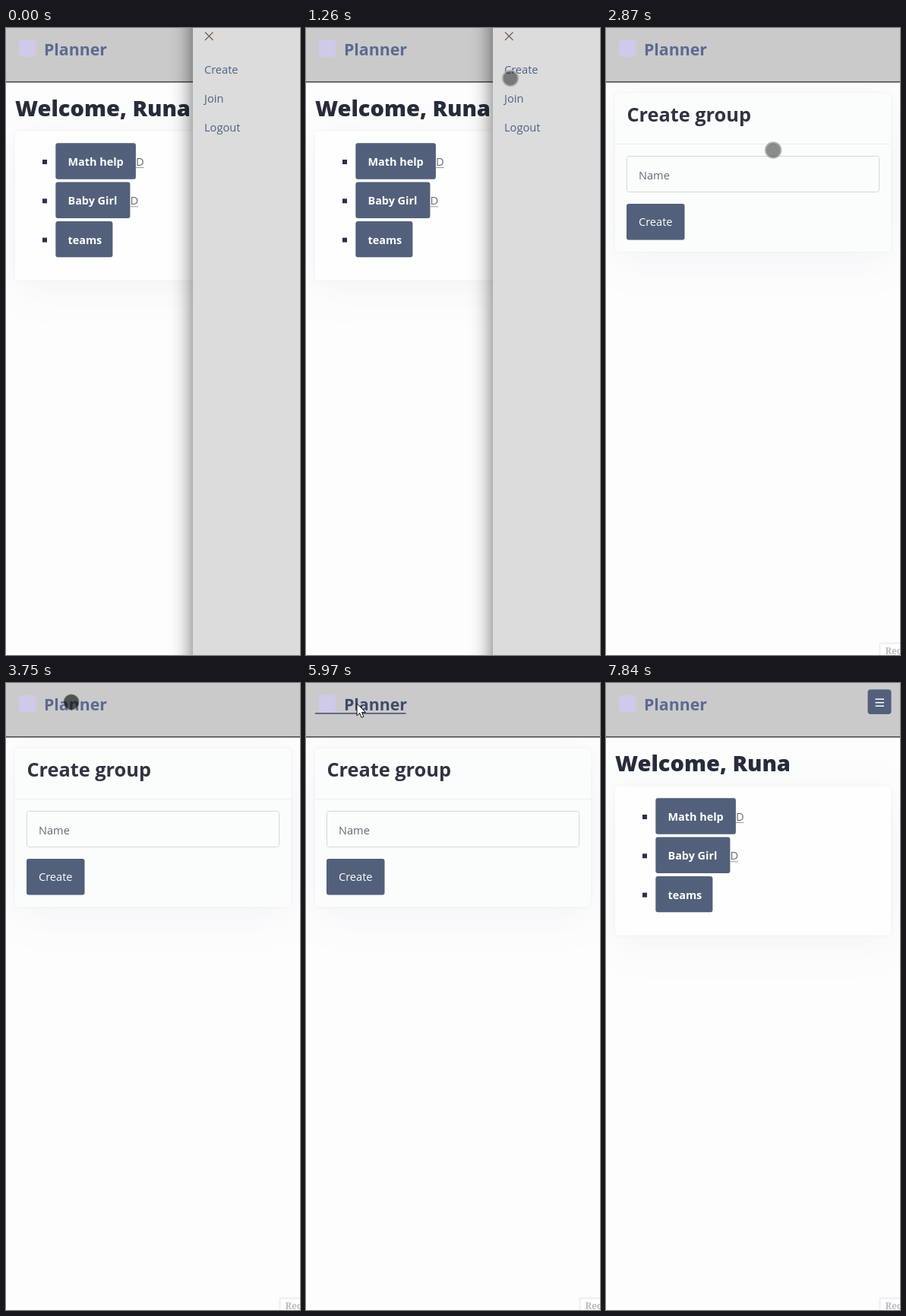
Animation, 387 px wide and 824 px high, one loop 8000 ms. Source, as an HTML page:

```html
<!DOCTYPE html>
<html lang="en">
<head>
<meta charset="utf-8">
<title>Planner</title>
<style>
  html, body { margin: 0; width: 100%; height: 100%; overflow: hidden; background: #fdfdfd; }
  svg { display: block; width: 387px; height: 824px; font: 14.6px "Open Sans", "Noto Sans", sans-serif; }
  .card { filter: drop-shadow(0 10px 28px rgba(70, 85, 150, .06)) drop-shadow(0 0 2px rgba(70, 85, 150, .06)); }
  .button { fill: #52607b; }
  .label { fill: #fff; }
  .strong { font-weight: 700; font-size: 14.4px; }
  .drawer { fill: #dcdcdc; filter: drop-shadow(0 0 14px rgba(0, 0, 0, .6)); }
  .link { fill: #4d6282; }
  .link.active { fill: #435472; }
  .brand { fill: #5b6a91; font-weight: 700; font-size: 21.3px; }
  .brand.active { fill: #3f4b6b; }
</style>
</head>
<body>
<svg viewBox="0 0 387 824">
  <rect width="387" height="824" fill="#fdfdfd"/>

  <g id="home">
    <text x="12" y="116" fill="#272d3b" font-size="29" font-weight="800">Welcome, Runa</text>
    <rect class="card" x="12" y="135.5" width="363" height="196" rx="4" fill="#fefefe"/>
    <g id="groups"></g>
  </g>

  <g id="create">
    <rect class="card" x="12" y="86" width="363" height="208" rx="4" fill="#fbfdfd"/>
    <path d="M12 152.5H375" stroke="#e9eef1"/>
    <text x="27.5" y="123" fill="#303442" font-size="25.3" font-weight="700">Create group</text>
    <rect x="27.5" y="168.5" width="332" height="47" rx="3" fill="#fbfdfd" stroke="#d3d6de"/>
    <text x="43" y="199" fill="#666a70">Name</text>
    <rect class="button" x="27" y="231" width="76.5" height="47.5" rx="3"/>
    <text class="label" x="43" y="260">Create</text>
  </g>

  <g id="badge">
    <rect x="360.5" y="808.5" width="40" height="30" fill="#fefefe" stroke="#eeeef0" stroke-width="2"/>
    <text x="367.5" y="823" fill="#b9bac4" style="font: 600 12px 'Noto Serif', serif">Rec</text>
  </g>

  <rect width="387" height="70" fill="#cacaca"/>
  <rect y="70" width="387" height="1.7" fill="#555"/>
  <rect x="17" y="16" width="22" height="22" rx="3" fill="#cfc9ea"/>
  <text id="brand" class="brand" x="50" y="36">Planner</text>
  <path id="brandLine" d="M12 40H131.5" stroke="#3f4b6b" stroke-width="1.6"/>
  <g id="menu">
    <rect class="button" x="344.5" y="8.5" width="31" height="32.5" rx="4"/>
    <path d="M354.5 21.2h11.5m-11.5 4.5h11.5m-11.5 4.5h11.5" stroke="#fff" stroke-width="1.4"/>
  </g>

  <g id="drawer">
    <rect class="drawer" x="246" y="-40" width="180" height="900"/>
    <path d="M262 5.5l10.5 10.5m0 -10.5l-10.5 10.5" stroke="#6a5a50" stroke-width="1.1"/>
    <text id="createLink" class="link" x="261" y="60">Create</text>
    <path id="createLine" d="M261 62.5H305" stroke="#435472"/>
    <text class="link" x="261" y="98">Join</text>
    <text class="link" x="261" y="136">Logout</text>
  </g>

  <circle id="touch" r="10.3" fill-opacity=".45" stroke="#b0b0b0" stroke-opacity=".8" stroke-width="2"/>
  <path id="arrow" d="M67 27v16l3.7 -3.4 2.4 5.8 2.8 -1.2 -2.4 -5.6h5z" fill="#fff" stroke="#111"/>
</svg>
<script>
  const el = id => document.getElementById(id);
  const show = (id, on) => { el(id).style.display = on ? '' : 'none'; };

  function groupRow(name, width, row, removable) {
    const y = 151 + row * 51.3;
    const end = 65 + width;
    const remove = `<text x="${end}" y="${y + 30}" fill="#6a6d75">D</text>
      <path d="M${end} ${y + 32.5}h10.5" stroke="#9a9da5"/>`;
    return `<rect x="48" y="${y + 22}" width="6" height="6" fill="#2b3048"/>
      <rect class="button" x="65.3" y="${y + .3}" width="${width - .4}" height="47.4" rx="3"/>
      <text class="label strong" x="81.5" y="${y + 30}">${name}</text>
      ${removable ? remove : ''}`;
  }
  el('groups').innerHTML =
    groupRow('Math help', 106, 0, true) +
    groupRow('Baby Girl', 98.5, 1, true) +
    groupRow('teams', 75.5, 2, false);

  // Places the pointer visits: arrival time, x, y
  const stops = [
    [260, 331, 793], [660, 256, 380], [1060, 302, 11],   // swing up to the drawer
    [1260, 269, 66], [1580, 270, 51],                    // press "Create"
    [2600, 248, 121], [2800, 234, 178],                  // drift away
    [3420, 113, 26], [3750, 86, 25], [5490, 66, 27],     // settle on the brand
    [6630, 68, 29], [7160, 212, 272], [7430, 338, 575],  // leave at the lower right
    [7840, 380, 817]
  ];

  function pointerAt(t) {
    const next = stops.findIndex(stop => stop[0] > t);
    if (next < 1) return stops[0].slice(1);
    const [t0, x0, y0] = stops[next - 1];
    const [t1, x1, y1] = stops[next];
    const k = (t - t0) / (t1 - t0);
    return [x0 + (x1 - x0) * k, y0 + (y1 - y0) * k];
  }

  function draw(now) {
    const t = now % 8000;
    const during = (from, to) => t >= from && t < to;
    const creating = during(2740, 6240);
    const linkActive = t >= 1520;
    const brandActive = during(5640, 6240);
    const arrowShown = during(5970, 6240);
    const pressed = during(3400, 4890);

    show('drawer', t < 2740);
    show('create', creating);
    show('home', !creating);
    show('menu', t >= 6240);
    show('createLine', linkActive);
    show('brandLine', brandActive);
    el('createLink').classList.toggle('active', linkActive);
    el('brand').classList.toggle('active', brandActive);

    show('arrow', arrowShown);
    show('touch', !arrowShown && (during(260, 7500) || during(7700, 7840)));
    const touch = el('touch');
    touch.setAttribute('transform', `translate(${pointerAt(t)})`);
    touch.setAttribute('fill-opacity', pressed ? .6 : .45);
    touch.setAttribute('stroke-opacity', pressed ? .2 : .8);
    requestAnimationFrame(draw);
  }
  requestAnimationFrame(draw);
</script>
</body>
</html>
```
